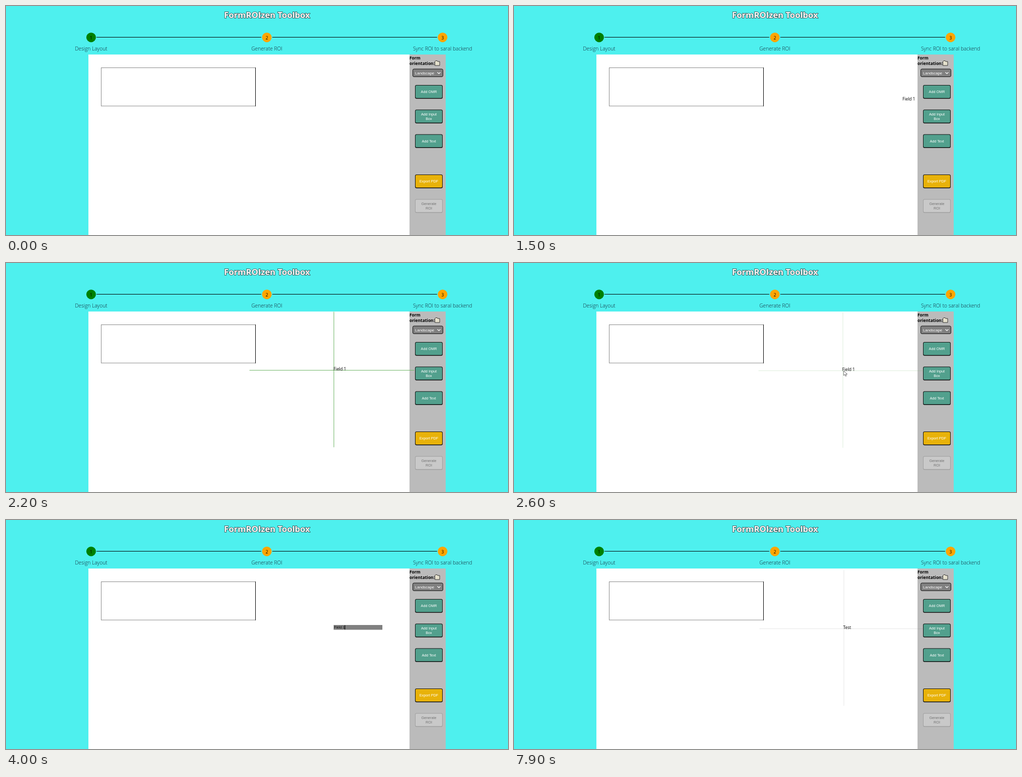
An HTML page for the animation above (8000 ms loop, 999 px wide and 458 px high).

```html
<!DOCTYPE html>
<html lang="en">
<head>
<meta charset="utf-8">
<title>Form layout designer</title>
<style>
  html, body { margin: 0; width: 100%; height: 100%; overflow: hidden; background: #4ef0ee; }
  svg { display: block; }
  text { font: 8.4px "Open Sans", "Noto Sans", sans-serif; }
  .title { font-size: 16.7px; font-weight: 700; fill: #fff; stroke: #333; stroke-width: 1.5px; paint-order: stroke; }
  .label { font-size: 10.2px; font-weight: 300; fill: #123; }
  .bold { font-weight: 700; }
  .ui { font: 7.25px "Liberation Sans", Arial, sans-serif; fill: #fff; }
  .mid { text-anchor: middle; }
</style>
</head>
<body>
<svg width="999" height="458" viewBox="0 0 999 458">
  <text class="title mid" x="519.5" y="24">FormROIzen Toolbox</text>
  <path d="M180 62.5H508M530 62.5H858" stroke="#000"/>
  <g id="steps"></g>

  <rect x="164" y="97" width="639" height="361" fill="#fff"/>
  <rect x="803" y="97" width="72" height="361" fill="#bbb"/>
  <rect x="189.5" y="123.5" width="307" height="76.5" fill="none" stroke="#888"/>
  <path d="M496.5 123V200.5" stroke="#000"/>

  <text class="bold" x="803" y="106.5">Form</text>
  <text class="bold" x="803" y="118">orientation:</text>
  <path d="M853.5 119V111l1.5-1.5h3l1 1.5h4v8z" fill="#e4e0cc" stroke="#222" stroke-width=".9"/>
  <rect x="809.5" y="126" width="60" height="15.5" rx="2.5" fill="#808080" stroke="#111"/>
  <text class="ui" x="814" y="136.6" style="font-size:7.8px">Landscape</text>
  <path d="M858.5 132.5l3 3 3-3" fill="none" stroke="#fff" stroke-width="1.2"/>
  <g id="buttons"></g>

  <path id="guides" fill="none"/>
  <text id="field"></text>
  <g id="editor">
    <rect x="652" y="210" width="97" height="9.5" fill="#808080"/>
    <text id="typed" class="ui" x="653" y="217.3" style="font-size:7px;fill:#111"></text>
    <rect id="caret" y="210.5" width="1.2" height="8.5"/>
  </g>
  <path id="cursor" d="M0 0V9.5L2.3 7.5 4 11 5.5 10.2 4 6.8H7.2Z" fill="#fff" stroke="#444" stroke-width=".8"/>
</svg>
<script>
const $ = id => document.getElementById(id);
const show = (el, on) => el.setAttribute('visibility', on ? 'visible' : 'hidden');
const clamp = (v, lo, hi) => Math.min(hi, Math.max(lo, v));
const ramp = (t, from, to) => clamp((t - from) / (to - from), 0, 1);
const ease = (t, from, to) => { const p = ramp(t, from, to); return p * p * (3 - 2 * p); };

$('steps').innerHTML = ['Design Layout', 'Generate ROI', 'Sync ROI to saral backend'].map((label, i) => {
  const x = 169.4 + i * 349.7;
  return `<circle cx="${x}" cy="62.8" r="9.6" fill="${i ? 'orange' : 'green'}"/>
    <text class="mid" x="${x}" y="66.7">${i + 1}</text>
    <text class="label mid" x="${x}" y="88.5">${label}</text>`;
}).join('');

// The dark backing shows as a border, heaviest at the bottom.
function button(y, label, fill = '#52a08d', edge = '#111', ink = '#fff') {
  const lines = label.split('\n');
  $('buttons').innerHTML += `
    <rect x="814" y="${y}" width="55" height="27.5" rx="3" fill="${edge}"/>
    <rect x="815" y="${y + 1}" width="53" height="25" rx="2" fill="${fill}"/>` +
    lines.map((s, i) => `<text class="ui mid" x="841.5" style="fill:${ink}"
      y="${y + 16.1 + (i - (lines.length - 1) / 2) * 8.4}">${s}</text>`).join('');
}
button(158, 'Add OMR');
button(207.3, 'Add Input\nBox');
button(256.6, 'Add Text');
button(337, 'Export PDF', '#e8b20a');
button(386.3, 'Generate\nROI', '#c9c9c9', '#a0a0a0', '#747474');

function drawCursor(t) {
  const enter = ease(t, 200, 800), leave = ease(t, 1000, 1400);
  const [x, y] = t < 1500
    ? [719 + 129 * enter - 86 * leave, 324 - 60 * enter - 77 * leave]
    : [656, 215.5];
  $('cursor').setAttribute('transform', `translate(${x} ${y})`);
  show($('cursor'), t >= 200 && t < 1500 || t >= 2400 && t < 3400);
}

function typedText(t) {
  if (t < 4700) return 'Field 1';
  if (t < 6000) return 'Field '.slice(0, 6 - 3 * clamp((t - 5100) / 100, 0, 2));
  const pair = start => clamp((t - start) / 100 + 1, 0, 2);
  return 'Test'.slice(0, pair(6100) + pair(6500));
}

function drawField(t) {
  const drag = ease(t, 1800, 2200), settle = ramp(t, 2200, 2600), nudge = ramp(t, 3500, 3600);
  const x = 773 - 121.3 * drag + 1.3 * settle + 2 * nudge;
  const y = 188.5 + 26 * drag + settle + 2.5 * nudge;
  const text = typedText(t), editing = t >= 4000 && t < 6900;

  $('field').textContent = text;
  $('field').setAttribute('x', x);
  $('field').setAttribute('y', y);
  show($('field'), t >= 1000 && !editing);

  show($('editor'), editing);
  $('typed').textContent = text;
  // A trailing space is not measured, so its width is added.
  const space = text.endsWith(' ') ? 1.9 : 0;
  $('caret').setAttribute('x', 652.8 + $('typed').getComputedTextLength() + space);
  show($('caret'), editing && t % 1000 < 500);

  const gx = Math.floor(x + 1) + .5, gy = Math.floor(y - .3) + .5;
  const opacity = t < 1800 ? 0
    : t < 3600 ? 1 - ramp(t, 2300, 2650) * .9 - ramp(t, 2600, 2900) * .1
    : t < 7800 ? .3 * (1 - ramp(t, 3600, 4000))
    : .18;
  $('guides').setAttribute('d', `M${gx - 168} ${gy}h328M${gx} ${Math.max(gy - 117, t < 2200 ? 0 : 97)}V${gy + 154}`);
  $('guides').setAttribute('stroke', t < 3000 ? '#6fb566' : '#777');
  $('guides').setAttribute('opacity', opacity);
}

function loop() {
  const t = Math.floor(performance.now() % 8000 / 100) * 100;
  drawCursor(t);
  drawField(t);
  requestAnimationFrame(loop);
}
loop();
</script>
</body>
</html>
```
